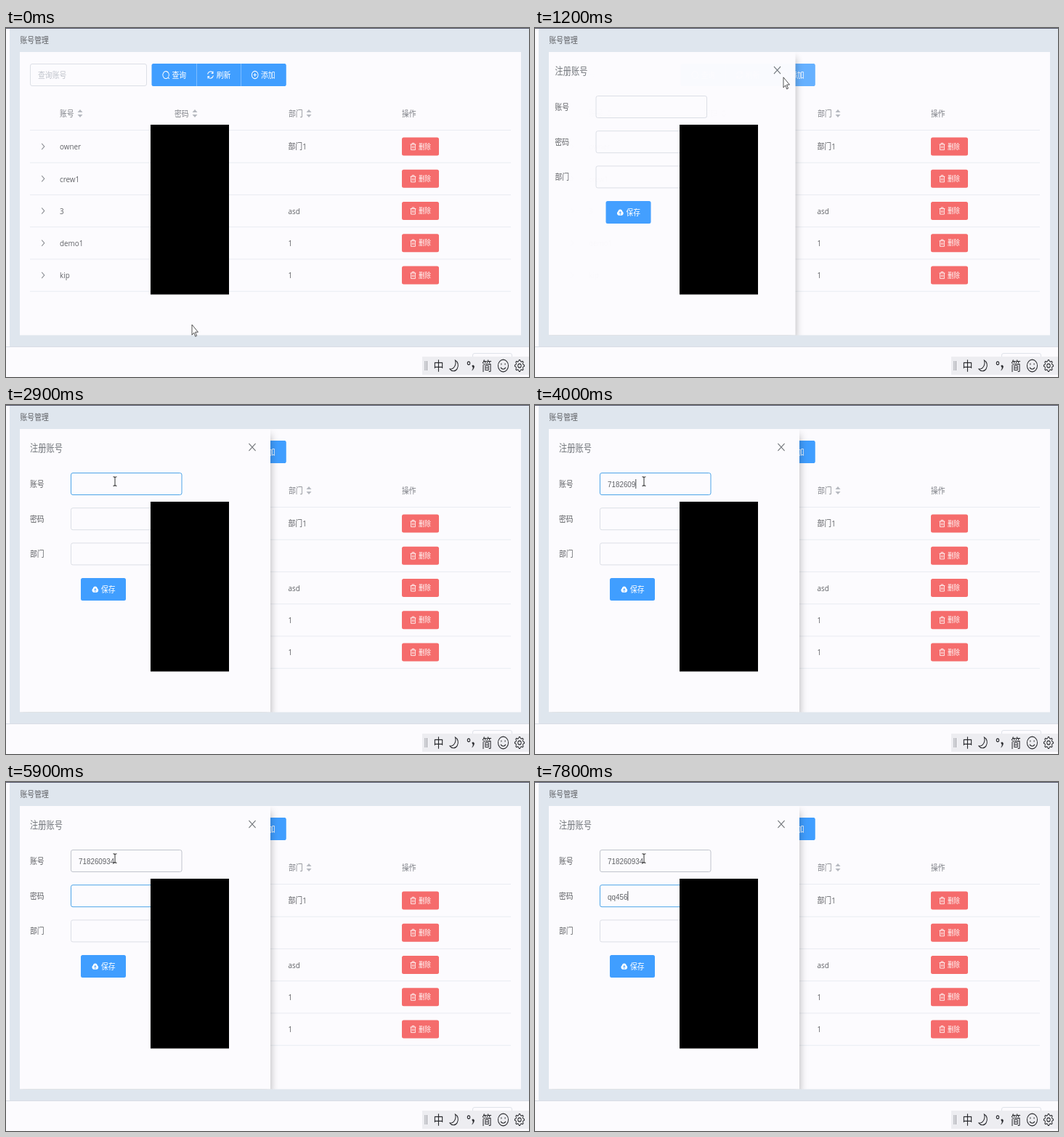
Animation of 720 by 480 pixels, one loop 8000 ms. Source, as an HTML page:

```html
<!DOCTYPE html>
<html lang="zh">
<head>
<meta charset="utf-8">
<style>
html, body { margin: 0; width: 100%; height: 100%; overflow: hidden; background: #fcfbfe; }
svg { display: block; }
text { font-family: "Open Sans", "Noto Sans CJK SC", "Noto Sans CJK", sans-serif; white-space: pre; }
.typed { font-family: "Liberation Sans", sans-serif; }
</style>
</head>
<body>
<svg id="stage" width="720" height="480" viewBox="0 0 720 480"></svg>
<script>
const LOOP = 8000, SX = 0.703, SY = 0.833; // the screen is squeezed from 1024x576
const BLUE = '#409eff', BLUE_HOVER = '#66b1ff', RED = '#f56c6c', PAPER = '#fcfbfe';
const INK = '#606266', LINE = '#dcdfe6', LINE_HOVER = '#c0c4cc', LINE_FOCUS = '#4ea5e8';

const squeeze = (x, y) => `transform="translate(${x} ${y}) scale(${SX} ${SY})"`;
const rect = (x, y, w, h, fill, more = '') =>
  `<rect x="${x}" y="${y}" width="${w}" height="${h}" fill="${fill}" ${more}/>`;
const text = (x, y, str, size = 14, fill = INK, more = '') =>
  `<text ${squeeze(x, y + size * 0.37 * SY)} font-size="${size}" fill="${fill}" ${more}>${str}</text>`;
const icon = (x, y, d, color = '#fff', width = 1.3, fill = 'none') =>
  `<path ${squeeze(x, y)} d="${d}" stroke="${color}" stroke-width="${width}" fill="${fill}"/>`;
const field = (x, y, w, id = '') =>
  rect(x + 0.5, y + 0.5, w, 30, PAPER, `rx="2.5" stroke="${LINE}" id="${id}"`);
const bold = 'font-weight="500"';

const ICONS = {
  search: 'M4 4.3A6 6 0 1 1 4.6 3.6M4 4L6.5 6.5',
  refresh: 'M-5.5-1A5.8 5.8 0 0 1 5-3M5-6V-2.6H1.8M5.5 1A5.8 5.8 0 0 1-5 3M-5 6V2.6H-1.8',
  add: 'M-6.2 0A6.2 6.2 0 1 1 6.2 0A6.2 6.2 0 1 1-6.2 0M-3 0H3M0-3V3',
  trash: 'M-5.5-3.5H5.5M-2-3.5V-5.5H2V-3.5M-4.2-3.5V5.5H4.2V-3.5M-1.5-.8V3M1.5-.8V3',
  chevron: 'M-2.6-5L2.6 0L-2.6 5',
  sort: 'M-5-1.8L0-6.5L5-1.8ZM-5 1.8L0 6.5L5 1.8Z',
  close: 'M-6.5-6L6.5 6M-6.5 6L6.5-6',
  cloud: 'M-3.5 5A3.4 3.4 0 0 1-4.2-1.4A4.3 4.3 0 0 1 4.2-1.4A3.4 3.4 0 0 1 3.5 5Z',
  arrowUp: 'M0 4V-1M-2.2 1.2L0-1L2.2 1.2',
};

function gearPath() {
  let d = '';
  for (let i = 0; i < 32; i++) {
    const a = (i - 0.5) * Math.PI / 16, r = i % 4 < 2 ? 9.5 : 7.3;
    d += `${i ? 'L' : 'M'}${(r * Math.cos(a)).toFixed(2)} ${(r * Math.sin(a)).toFixed(2)}`;
  }
  return d + 'ZM-3.2 0A3.2 3.2 0 1 1 3.2 0A3.2 3.2 0 1 1-3.2 0';
}

function toolbar() {
  const items = [['查询', 'search'], ['刷新', 'refresh'], ['添加', 'add']];
  return field(33, 49, 160) + text(44, 64.5, '查询账号', 14, '#c0c4cc') +
    rect(200.5, 49, 185, 31, BLUE, 'rx="2.5"') +
    `<path id="addButton" d="M323.5 49H383a2.5 2.5 0 0 1 2.5 2.5V77.500a2.5 2.5 0 0 1-2.5 2.500H323.5Z"/>` +
    [262, 323].map(x => rect(x, 49, 0.8, 31, '#8cc5ff')).join('') +
    items.map(([label, name], i) => icon(220.3 + 61.2 * i, 64.5, ICONS[name]) +
      text(228.500 + 61.2 * i, 64.5, label, 14, '#fff', bold)).join('');
}

function table() {
  const heads = [[74, '账号'], [232, '密码'], [389, '部门'], [545, '操作']];
  const rows = [['owner', '部门1'], ['crew1', ''], ['3', 'asd'], ['demo1', '1'], ['kip', '1']];
  let out = rect(33, 140, 662, 1, '#e9ecf2');
  heads.forEach(([x, label], i) => {
    out += text(x, 117.5, label, 14, '#808389', bold);
    if (i < 3) out += icon(x + 28, 117.5, ICONS.sort, 'none', 0, '#b6b9c0');
  });
  rows.forEach(([name, unit], i) => {
    const y = 163 + 44.25 * i;
    out += icon(51, y, ICONS.chevron, '#85888e') + text(74, y, name) + text(388.5, y, unit) +
      rect(545, y - 12.5, 51, 25, RED, 'rx="2.5"') + icon(560.5, y, ICONS.trash, '#fff', 1.1) +
      text(568, y, '删除', 12, '#fff', bold) + rect(33, y + 21.7, 662, 1, '#e9ecf2');
  });
  return out;
}

function drawer() {
  const labels = ['账号', '密码', '部门'];
  return rect(19, 33, 345, 389.5, PAPER, 'style="filter:drop-shadow(0 8px 6px rgba(0,0,0,.3))"') +
    text(33, 59, '注册账号', 16, '#72767b') + icon(339, 58, ICONS.close, '#72767b') +
    labels.map((label, i) => text(33, 108.5 + 48.2 * i, label) +
      field(89, 93 + 48.2 * i, 152.5, 'field' + i) +
      text(100, 109 + 48.2 * i, '', 14, INK, `class="typed" id="typed${i}"`)).join('') +
    rect(0, 0, 1, 13, '#4a4c50', 'id="caret"') +
    rect(103, 238, 62, 31, BLUE, 'rx="2.5"') + icon(122.8, 253.5, ICONS.cloud, 'none', 0, '#fff') +
    icon(122.8, 253.5, ICONS.arrowUp, BLUE, 1.2) + text(131, 253.5, '保存', 14, '#fff', bold);
}

function inputBar() {
  const ink = '#26272b', face = 'M-10 0A10 10 0 1 1 10 0A10 10 0 1 1-10 0M-5 3Q0 8.500 5 3M-3.7-4V-1.5M3.7-4V-1.5';
  return rect(642.5, 447.5, 54, 26, PAPER, 'rx="2.5" stroke="#e0e3ea"') +
    rect(573, 452, 147, 25, '#ededf1') +
    rect(576.5, 458, 1, 13, '#9a9ca2') + rect(579, 458, 1, 13, '#9a9ca2') +
    text(588.5, 464.5, '中', 20, ink) + text(655, 464.5, '简', 20, ink) +
    icon(617, 464.5, 'M2-9A9.200 9.200 0 1 1-8.500 5.500A10.500 10.500 0 0 0 2-9Z', ink, 1.4) +
    icon(637, 461, 'M-2.500 0A2.500 2.500 0 1 1 2.500 0A2.500 2.500 0 1 1-2.500 0', ink, 1.4) +
    icon(643, 466, 'M-2-1.500A2.200 2.200 0 1 1 2 1Q1 4.500-2 6Q0 3 0 1.500Z', ink, 0.5, ink) +
    icon(684.5, 464.5, face, ink, 1.4) + icon(707, 464.5, gearPath(), ink, 1.3);
}

const cursors =
  icon(0, 0, 'M0 0V17L4 13.300L6.700 19.500L9.300 18.400L6.600 12.300H12Z', '#222', 1, '#fff') +
  icon(0, 0, 'M-1.500 1.500Q0-1 1.500 1.500V8L8.500 9.500Q10.300 10 10 12.500L8.500 17V20.500H-1.500V18L-6 12Q-6.500 9.500-4 10.500L-1.500 13ZM1.500 8V11M4 8.600V11.500M6.500 9V12', '#222', 1, '#fff') +
  icon(0, 0, 'M-3.500-7.500Q0-7.500 0-6Q0-7.500 3.500-7.500M0-6V6M-3.500 7.500Q0 7.500 0 6Q0 7.500 3.500 7.500', '#222', 1.3);

const stage = document.getElementById('stage');
stage.innerHTML =
  '<clipPath id="card"><rect x="19" y="33" width="690" height="389.5"/></clipPath>' +
  rect(0, 0, 720, 480, PAPER) + rect(5, 0, 715, 438, '#dfe6ee') +
  rect(0, 438, 720, 1, '#d9dde5') + rect(0, 0, 720, 1, '#55566a') +
  text(19.5, 17, '账号管理') + rect(19, 33, 690, 389.5, PAPER) +
  toolbar() + table() +
  `<g clip-path="url(#card)"><g id="drawer">${drawer()}</g></g>` +
  inputBar() + `<g id="cursor">${cursors}</g>` + rect(199, 133, 108, 233.5, '#000');

const el = id => document.getElementById(id);
const clamp = x => Math.min(1, Math.max(0, x));
const smooth = x => x * x * (3 - 2 * x);
const span = (t, from, to) => clamp((t - from) / (to - from));
const mix = (a, b, k) => `color-mix(in srgb, ${b} ${100 * k}%, ${a})`;

// CSS "ease": cubic-bezier(.25, .1, .25, 1)
function ease(x) {
  const curve = (u, a, b) => 3 * u * (1 - u) * ((1 - u) * a + u * b) + u ** 3;
  let lo = 0, hi = 1;
  for (let i = 0; i < 24; i++) {
    const mid = (lo + hi) / 2;
    if (curve(mid, 0.25, 0.25) < x) lo = mid; else hi = mid;
  }
  return curve(lo, 0.1, 1);
}

const OPEN = 950, FOCUS = 2250, TAB = 5100;
const typing = [
  { str: '718260934', focus: FOCUS, keys: [2950, 3150, 3350, 3500, 3650, 3800, 3950, 4150, 4350] },
  { str: 'qq456', focus: TAB, keys: [6050, 6400, 7050, 7270, 7450] },
];

function drawCursor(t) {
  const go = smooth(span(t, 150, 800)), back = smooth(span(t, 1150, 1750));
  const x = 256 + 90 * go - 196 * back, y = 408 - 341 * go + 38 * back;
  const overButton = t < 1200 && y < 80;
  const overField = t > 1200 && x < 242 && y > 93;
  const kind = overButton ? 1 : overField ? 2 : 0;
  el('cursor').setAttribute('transform', `translate(${x} ${y})`);
  [...el('cursor').children].forEach((c, i) => c.style.display = i === kind ? '' : 'none');
}

function draw(t) {
  const p = ease(span(t, OPEN, OPEN + 300));
  el('drawer').setAttribute('transform', `translate(${-345 * (1 - p)} 0)`);
  el('drawer').setAttribute('opacity', p);
  const lit = span(t, 770, 870) - span(t, FOCUS, FOCUS + 100);
  el('addButton').style.fill = mix(BLUE, BLUE_HOVER, lit);

  const tabbed = ease(span(t, TAB, TAB + 200));
  const hover = mix(LINE, LINE_HOVER, ease(span(t, 1720, 1920)));
  const focus = ease(span(t, FOCUS, FOCUS + 200)) - tabbed;
  el('field0').style.stroke = mix(hover, LINE_FOCUS, focus);
  el('field1').style.stroke = mix(LINE, LINE_FOCUS, tabbed);

  typing.forEach(({ str, keys }, i) =>
    el('typed' + i).textContent = str.slice(0, keys.filter(k => k <= t).length));
  const active = t < TAB ? 0 : 1, { focus: start, keys } = typing[active];
  const last = Math.max(start, ...keys.filter(k => k <= t));
  const caret = el('caret');
  caret.setAttribute('x', 100 + el('typed' + active).getComputedTextLength() * SX);
  caret.setAttribute('y', 102 + 48.2 * active);
  caret.style.display = t >= start && (t - last) % 1060 < 530 ? '' : 'none';
  drawCursor(t);
}

const began = performance.now();
function tick() {
  draw((performance.now() - began) % LOOP);
  requestAnimationFrame(tick);
}
tick();
</script>
</body>
</html>
```
